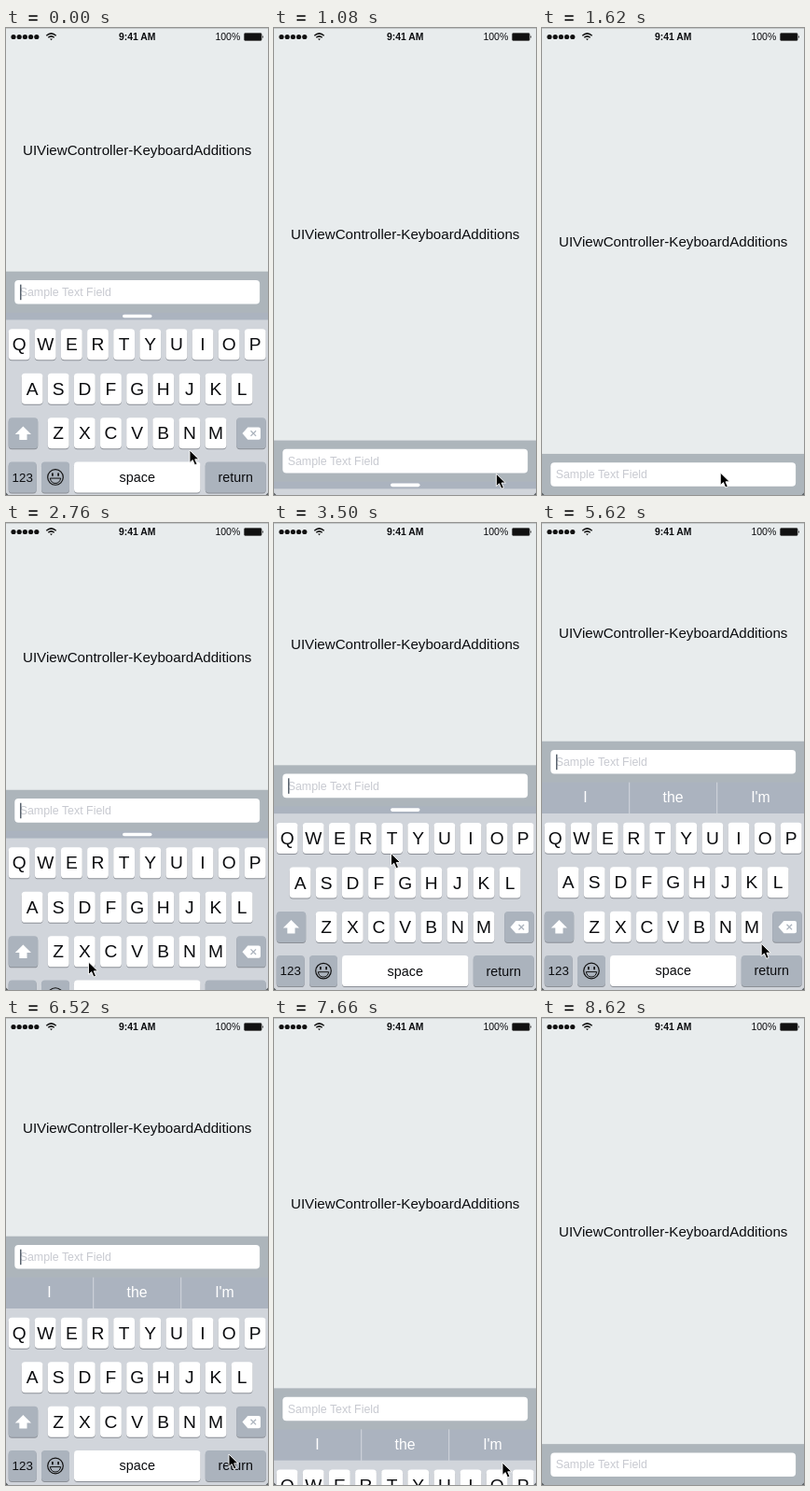
These frames come from a looping animation (281x500 px, 8.64 s). An HTML page:

```html
<!DOCTYPE html>
<html lang="en">
<head>
<meta charset="utf-8">
<title>Keyboard additions</title>
<style>
html, body { margin: 0; width: 100%; height: 100%; overflow: hidden; background: #e8eced; }
svg { display: block; width: 100vw; height: 100vh; font-family: "Liberation Sans", Arial, sans-serif; }
</style>
</head>
<body>
<svg viewBox="0 0 281 500" fill="#0b0c0f">
  <rect width="281" height="500" fill="#e8eced"/>
  <rect width="281" height="1" fill="#c5c9ca"/>
  <g id="dots"></g>
  <g fill="none" stroke="#111" stroke-width="1.5">
    <path d="M43.3 8.2q5.2-4.6 10.4 0M45.3 10.3q3.2-2.8 6.4 0"/>
    <path d="M47 11.6h3l-1.5 1.6z" fill="#111" stroke="none"/>
  </g>
  <text x="140.7" y="13" font-size="10.4" font-weight="bold" text-anchor="middle">9:41 AM</text>
  <text x="224.4" y="13" font-size="10.5">100%</text>
  <rect x="255.5" y="5.5" width="18.6" height="8" rx="1.2" fill="#111" stroke="#444" stroke-width=".6"/>
  <path d="M275 7.8q1.8 1.7 0 3.4z" fill="#111"/>
  <text id="label" x="140.7" font-size="15.15" text-anchor="middle">UIViewController-KeyboardAdditions</text>

  <g id="bar">
    <rect width="281" height="45" fill="#adb5bb"/>
    <rect x="9.3" y="9.3" width="262.8" height="25.6" rx="4" fill="#fff"/>
    <text x="14.7" y="26.2" font-size="12.4" fill="#c8cad1">Sample Text Field</text>
    <rect id="caret" x="15" y="14" width="1.5" height="16.5" fill="#59636e"/>
  </g>

  <g id="strip">
    <rect width="281" height="36" fill="#abb3bf"/>
    <rect id="handle" x="125" y="2" width="31.5" height="3.6" rx="1.8" fill="#fff"/>
    <g id="words" fill="#fff" font-size="15.8" text-anchor="middle">
      <path d="M93.7 0v34M187.7 0v34" stroke="#d3d7de"/>
    </g>
  </g>

  <g id="keys" text-anchor="middle">
    <rect y="311" width="281" height="190" fill="#d1d5db"/>
  </g>

  <path d="M0 497.500V500H2.500zM281 497.500V500H278.500z" fill="#5b6064"/>
  <path id="cursor" d="M0 0V13.400L3.200 10.600L5.500 16L8 15L5.700 9.800H10z" fill="#000" stroke="#fff" stroke-width=".9"/>
</svg>
<script>
const LOOP = 8640;
const SPEED = 0.0085;
// keyboard starts to rise, fall, rise and fall
const RISE1 = -820, FALL1 = 580, RISE2 = 2348, FALL2 = 7356;
const $ = id => document.getElementById(id);

function add(parent, tag, attrs, content = "") {
  const el = document.createElementNS("http://www.w3.org/2000/svg", tag);
  for (const k in attrs) el.setAttribute(k, attrs[k]);
  el.textContent = content;
  $(parent).append(el);
}

function key(x, y, width, text = "", size = 19.2, dark = false) {
  const box = { x, width, height: 33, rx: 3.7 };
  add("keys", "rect", { ...box, y: y + 1, fill: "#8b8f96" });
  add("keys", "rect", { ...box, y, fill: dark ? "#abb3bd" : "#fff" });
  const base = y + 16.5 + size * 0.345;
  add("keys", "text", { x: x + width / 2, y: base, "font-size": size }, text);
}

for (let i = 0; i < 5; i++) add("dots", "circle", { cx: 8 + i * 6.2, cy: 9.5, r: 2.6, fill: "#111" });
["I", "the", "I'm"].forEach((s, i) => add("words", "text", { x: 46.5 + i * 94, y: 21.5 }, s));

[["QWERTYUIOP", 2.7], ["ASDFGHJKL", 16.7], ["ZXCVBNM", 44.8]].forEach(([row, x], r) =>
  [...row].forEach((c, i) => key(x + i * 28.13, 320.8 + r * 47.5, 22.8, c)));
key(2.7, 415.8, 31.5, "", 19, true);
key(247.2, 415.8, 31.5, "", 19, true);
key(2.7, 463, 30, "123", 13.3, true);
key(38, 463, 30, "", 19, true);
key(73, 463, 135.5, "space", 14.4);
key(213.8, 463, 65, "return", 14.3, true);

// shift, delete and smiley icons
add("keys", "path", { d: "M18.400 425l8.600 8.500h-4.500v6h-8.200v-6h-4.500z", fill: "#fff" });
add("keys", "path", { d: "M253.500 432.600l5.800-6.600h11.700q2 0 2 2v9.200q0 2-2 2h-11.700z", fill: "#fff" });
add("keys", "path", { d: "M262.500 429.800l5.600 5.600m0-5.600l-5.600 5.600", stroke: "#abb3bd", "stroke-width": 1.3 });
add("keys", "circle", { cx: 53, cy: 479.5, r: 8.3, fill: "none", stroke: "#111", "stroke-width": 1.2 });
add("keys", "path", { d: "M49.900 475v3.200M56.100 475v3.200", stroke: "#111", "stroke-width": 1.7 });
add("keys", "path", { d: "M47.300 480.600h11.400q-1.200 5.400-5.700 5.400t-5.700-5.400z", fill: "none", stroke: "#111" });

// pointer path: time, x, y
const path = [
  [0, 197, 452], [350, 237, 470], [650, 240, 474], [1250, 238, 478], [1620, 191.3, 476],
  [1770, 108, 481], [2020, 88, 480], [2420, 88, 480], [2760, 88.5, 470], [3900, 140, 308],
  [4400, 141, 306], [4820, 181, 227], [4940, 183, 222], [5750, 239, 467], [7350, 239, 467],
  [7660, 245, 476], [8300, 286, 503], [LOOP, 286, 503]
];

const clamp = v => Math.min(1, Math.max(0, v));
const smooth = v => v * v * (3 - 2 * v);
const mix = (a, b, v) => a + (b - a) * v;
const move = (id, x, y) => $(id).setAttribute("transform", `translate(${x} ${y})`);

// share of a damped move still to go, since its start
function left(t, start) {
  const s = Math.max(0, t - start) * SPEED;
  return (1 + s) * Math.exp(-s);
}

function hidden(t) {
  if (t < FALL1) return left(t, RISE1);
  if (t < RISE2) return 1 - left(t, FALL1);
  if (t < FALL2) return left(t, RISE2);
  return 1 - left(t, FALL2);
}

function draw(t) {
  const words = smooth(clamp((t - 4825) / 110));
  const height = mix(8, 33.5, words);
  const shownTop = 311.2 - height - 44;
  const shift = hidden(t) * (456.2 - shownTop);
  const top = shownTop + shift;

  move("bar", 0, top);
  move("strip", 0, top + 44);
  move("keys", 0, shift);
  $("label").setAttribute("y", top / 2 + 5.7);
  $("words").setAttribute("opacity", words);
  $("handle").setAttribute("opacity", 1 - words);

  const focused = t < FALL1 || (t >= RISE2 && t < FALL2);
  const phase = t % 1000;
  $("caret").setAttribute("opacity", focused && (phase < 40 || phase > 500) ? 1 : 0);

  const i = path.findIndex(p => p[0] > t);
  const [t0, x0, y0] = path[i - 1], [t1, x1, y1] = path[i];
  const v = smooth((t - t0) / (t1 - t0));
  move("cursor", mix(x0, x1, v), mix(y0, y1, v));
}

const begin = performance.now();
function tick() {
  draw((performance.now() - begin) % LOOP);
  requestAnimationFrame(tick);
}
tick();
</script>
</body>
</html>
```
